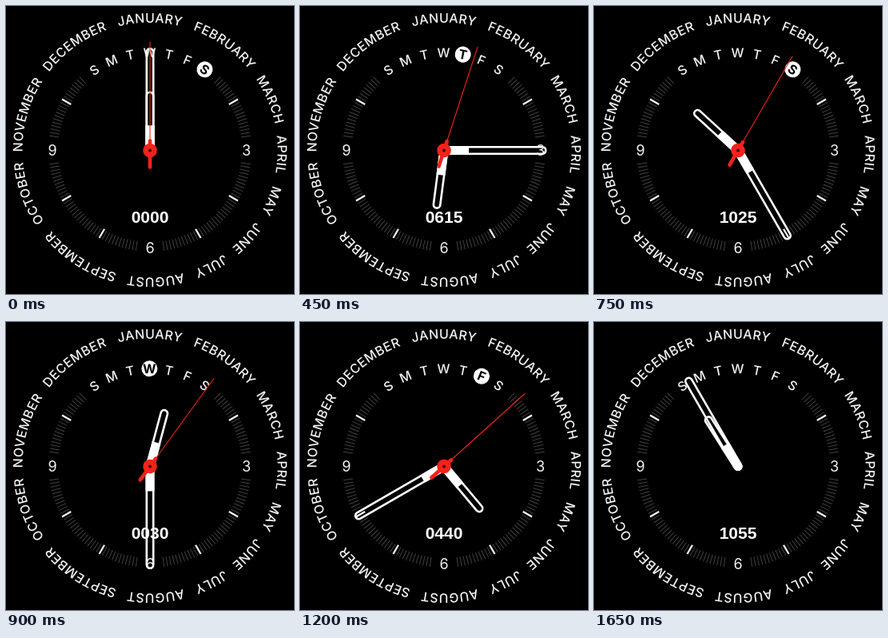
An HTML page that plays this animation: 360x360 px, repeating every 1800 ms.

```html
<!DOCTYPE html>
<html lang="en">
<head>
<meta charset="utf-8">
<title>Calendar clock</title>
<style>
  html, body { margin: 0; width: 100%; height: 100%; overflow: hidden; background: #000; }
  svg { display: block; width: 100vw; height: 100vh; }
  text { font-family: Inter, Roboto, sans-serif; fill: #f4f4f4; text-anchor: middle; }
  .month { font-size: 16px; font-weight: 500; letter-spacing: .5px; }
  .day { font-size: 16px; font-weight: 500; }
  .day circle { fill: none; }
  .day.on circle { fill: #fff; }
  .day.on text { fill: #000; font-weight: 700; }
  .numeral { font-size: 18px; }
  #digits { font: bold 21px "Liberation Sans", Arial, sans-serif; fill: #fff; }
</style>
</head>
<body>
<svg viewBox="0 0 360 360">
  <defs><path id="arc" d="M-159.5 0A159.5 159.5 0 0 1 159.5 0"/></defs>
  <g id="dial" transform="translate(180 180)"></g>
  <text id="digits" x="180" y="270.5"></text>
  <g id="hands" transform="translate(180 180.5)"></g>
</svg>
<script>
const STEP = 150, STEPS = 12;
const MINUTES_PER_STEP = 125;
const SECOND_STEPS = 10;
// Highlighted weekday per step, Sunday = 0, -1 = none
const DAY_AT = [6, 3, 6, 4, 1, 6, 3, 1, 5, 3, -1, -1];
const MONTHS = [
  ["JANUARY", 0], ["FEBRUARY", 35.5], ["MARCH", 67.3], ["APRIL", 92],
  ["MAY", 112.8], ["JUNE", 132.3], ["JULY", 152.3], ["AUGUST", 177.6],
  ["SEPTEMBER", 213], ["OCTOBER", 250.4], ["NOVEMBER", 286], ["DECEMBER", 324]
];

const dial = document.getElementById("dial");
const hands = document.getElementById("hands");
const digits = document.getElementById("digits");

function add(parent, tag, attrs = {}, text = "") {
  const el = document.createElementNS("http://www.w3.org/2000/svg", tag);
  for (const key in attrs) el.setAttribute(key, attrs[key]);
  if (text) el.textContent = text;
  return parent.appendChild(el);
}

function spoke(parent, from, to, color, width, extra = {}) {
  return add(parent, "line", { y1: -from, y2: -to, stroke: color, "stroke-width": width, ...extra });
}

const turn = (el, deg) => el.setAttribute("transform", `rotate(${deg})`);

for (const [name, angle] of MONTHS) {
  const label = add(dial, "text", { class: "month", transform: `rotate(${angle})` });
  add(label, "textPath", { href: "#arc", startOffset: "50%" }, name);
}

for (let a = 44; a <= 316; a += 2) {
  const fromNumeral = Math.abs((a + 45) % 90 - 45);
  if (a % 30 && fromNumeral > 7) turn(spoke(dial, 115, 127, "#424242", 1), a);
}
for (const a of [60, 120, 150, 210, 240, 300]) turn(spoke(dial, 114, 127, "#f4f4f4", 2.3), a);

for (const [n, x, y] of [["3", 120.5, 0], ["6", 0, 122], ["9", -122, 0]])
  add(dial, "text", { class: "numeral", x, y: y + 6.5 }, n);

const days = [..."SMTWTFS"].map((letter, i) => {
  const g = add(dial, "g", { class: "day", transform: `rotate(${(i - 3) * 11.5 - .3}) translate(0 -121.7)` });
  add(g, "circle", { r: 10 });
  add(g, "text", { y: 5.8 }, letter);
  return g;
});

function makeHand(length) {
  const g = add(hands, "g");
  add(g, "rect", {
    x: -4.2, y: 1.3 - length, width: 8.4, height: length + 2.9, rx: 4.2,
    fill: "none", stroke: "#fff", "stroke-width": 2.6
  });
  spoke(g, 0, 31, "#fff", 11);
  add(g, "circle", { r: 5.5, fill: "#fff" });
  return g;
}

const hourHand = makeHand(74);
const minuteHand = makeHand(128.5);

const RED = "#f5221a";
const secondHand = add(hands, "g");
spoke(secondHand, 0, 136, RED, 1.1);
spoke(secondHand, -21, 12, RED, 4.6, { "stroke-linecap": "round" });
add(secondHand, "circle", { r: 8.8, fill: RED });
add(secondHand, "circle", { r: 2, fill: "#300" });

let shown = -1;

function show(step) {
  const total = step * MINUTES_PER_STEP % 720;
  const pad = n => String(n).padStart(2, "0");
  digits.textContent = pad(Math.floor(total / 60)) + pad(total % 60);
  turn(hourHand, total / 2);
  turn(minuteHand, total % 60 * 6);
  turn(secondHand, step * 6);
  secondHand.style.display = step < SECOND_STEPS ? "" : "none";
  days.forEach((day, i) => day.classList.toggle("on", i === DAY_AT[step]));
}

function tick() {
  const step = Math.floor(performance.now() / STEP) % STEPS;
  if (step !== shown) show(shown = step);
  requestAnimationFrame(tick);
}
tick();
</script>
</body>
</html>
```
